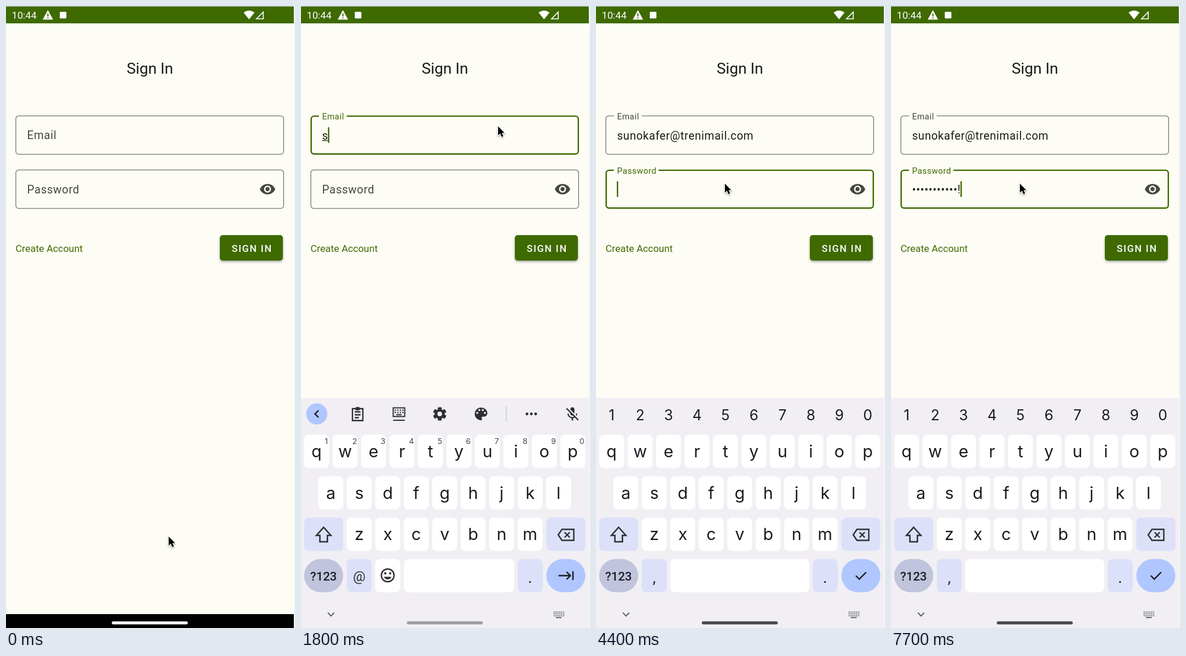
These frames come from a looping animation (500 by 1075 pixels, 8 s). An HTML page with a canvas:

```html
<!DOCTYPE html>
<html lang="en">
<head>
<meta charset="utf-8">
<title>Sign In</title>
<style>
html, body { margin: 0; width: 100%; height: 100%; overflow: hidden; background: #f6f6f4; }
canvas { display: block; }
</style>
</head>
<body>
<canvas id="stage" width="500" height="1075"></canvas>
<script>
const c = document.getElementById('stage').getContext('2d');
const LOOP = 8000, TICK = 100, W = 498;
const PAGE = '#fdfdf5', GREEN = '#3e6a00', INK = '#1b1c18', GREY = '#46483f', LINE = '#75786c';
const BOARD = '#f1eff4', KEY_INK = '#1c1c20', ICON = '#303034';
const TINT = '#dce1f9', DIM = '#c0c4dc', BLUE = '#b0c6ff';
const USER = 'sunokafer', DOMAIN = '@trenimail.com', SECRET = 'password123!';
const USER_TIMES = [1800, 2000, 2200, 2300, 2500, 2700];
const SECRET_TIMES = [5300, 5700, 5900, 6000, 6100, 6200, 6300, 6400, 6600, 7000, 7100, 7700];
const FILL_AT = 3400, EMAIL_AT = 1100, SECRET_AT = 4200;

const clamp = v => Math.max(0, Math.min(1, v));
const mix = (a, b, p) => a + (b - a) * p;
const smooth = p => p * p * (3 - 2 * p);
const decel = p => 1 - (1 - p) ** 2;
const count = (times, t) => times.filter(s => s <= t).length;

function text(str, x, y, size, color = INK, { align = 'left', weight = 400, gap = 0, font = 'Roboto' } = {}) {
  c.font = `${weight} ${size}px ${font}, sans-serif`;
  c.letterSpacing = gap + 'px';
  c.textAlign = align;
  c.fillStyle = color;
  c.fillText(str, x, y);
  return c.measureText(str).width;
}
const keyText = (str, x, y, size, color = KEY_INK, weight = 400) =>
  text(str, x, y, size, color, { align: 'center', weight, font: 'Inter' });

function box(x, y, w, h, r, color) {
  c.fillStyle = color;
  c.beginPath();
  c.roundRect(x, y, w, h, r);
  c.fill();
}
function disc(x, y, r, color) {
  c.fillStyle = color;
  c.beginPath();
  c.arc(x, y, r, 0, 7);
  c.fill();
}
function stroke(d, x, y, width = 2.4, color = ICON) {
  c.save();
  c.translate(x, y);
  c.lineWidth = width;
  c.strokeStyle = color;
  c.stroke(new Path2D(d));
  c.restore();
}
function fill(d, x, y, color = ICON, scale = 1) {
  c.save();
  c.translate(x, y);
  c.scale(scale, scale);
  c.fillStyle = color;
  c.fill(new Path2D(d), 'evenodd');
  c.restore();
}
// 24-unit icon centred on x, y
const icon = (d, x, y, color, s = 1.211) => fill(d, x - 12 * s, y - 12 * s, color, s);

const EYE = 'M12 4.5C7 4.5 2.73 7.61 1 12c1.73 4.39 6 7.5 11 7.5s9.27-3.11 11-7.5c-1.73-4.39-6-7.5-11-7.5z' +
  'M12 17c-2.76 0-5-2.24-5-5s2.24-5 5-5 5 2.24 5 5-2.24 5-5 5zm0-8c-1.66 0-3 1.34-3 3s1.34 3 3 3 3-1.34 3-3-1.34-3-3-3z';
const PALETTE = 'M12 3c-4.97 0-9 4.03-9 9s4.03 9 9 9c.83 0 1.5-.67 1.5-1.5 0-.39-.15-.74-.39-1.01-.23-.26-.38-.61-.38-.99 ' +
  '0-.83.67-1.5 1.5-1.5H16c2.76 0 5-2.24 5-5 0-4.42-4.03-8-9-8z';
const MIC_OFF = 'M19 11h-1.7c0 .74-.16 1.43-.43 2.05l1.23 1.23c.56-.98.9-2.09.9-3.28zm-4.02.17c0-.06.02-.11.02-.17V5' +
  'c0-1.66-1.34-3-3-3S9 3.34 9 5v.18l5.98 5.99zM4.27 3L3 4.27l6.01 6.01V11c0 1.66 1.33 3 2.99 3 .22 0 .44-.03.65-.08' +
  'l1.66 1.66c-.71.33-1.5.52-2.31.52-2.76 0-5.3-2.1-5.3-5.1H5c0 3.41 2.72 6.23 6 6.72V21h2v-3.28c.91-.13 1.77-.45 2.54-.9' +
  'L19.73 21 21 19.73 4.27 3z';

function statusBar() {
  c.fillStyle = '#c9cbc4';
  c.fillRect(0, 0, W, 1);
  c.fillStyle = GREEN;
  c.fillRect(0, 1, W, 29);
  text('10:44', 10, 22, 17.2, '#fff');
  fill('M0-9L9 7.5H-9ZM-1-3V2H1V-3ZM-1 3.6V5.6H1V3.6Z', 72.5, 16, '#fff');
  box(93, 10, 11.5, 11.5, 1.5, '#fff');
  fill('M0 7.5L-9.5-4.2Q0-11.5 9.5-4.2Z', 420.5, 15.5, '#fff');
  stroke('M6 6.2H-5.6L6-5.6Z', 439, 16, 1.6, '#fff');
}

// The border grows inwards when the field is focused.
function outline(y, notch, focused) {
  const width = focused ? 2.4 : 1.3, inset = width / 2, k = 5;
  const l = 16.4 + inset, r = 481 - inset, top = y - 0.8 + inset, b = y + 67 - inset;
  c.strokeStyle = focused ? GREEN : LINE;
  c.lineWidth = width;
  c.beginPath();
  c.moveTo(31 + notch, top);
  c.arcTo(r, top, r, b, k);
  c.arcTo(r, b, l, b, k);
  c.arcTo(l, b, l, top, k);
  c.arcTo(l, top, r, top, k);
  c.lineTo(31, top);
  c.stroke();
}

function field(label, y, notch, start, focused, t) {
  const p = smooth(clamp((t - start - 50) / 167));
  const size = mix(19.4, 14.5, p);
  outline(y, p > 0 ? notch : 0, focused);
  text(label, 36.5, mix(y + 40, y + 6, p), size, focused ? GREEN : GREY, { gap: size / 32 });
}

function caret(x, y, t, since) {
  if (Math.floor((t - since) / 500) % 2) return;
  c.fillStyle = GREEN;
  c.fillRect(x, y, 2.4, 27);
}

function form(t) {
  c.fillStyle = PAGE;
  c.fillRect(0, 1, W, 1074);
  statusBar();
  text('Sign In', 249, 117, 26.65, INK, { align: 'center' });

  const onEmail = t >= EMAIL_AT && t < SECRET_AT, onSecret = t >= SECRET_AT;
  field('Email', 190, 48, EMAIL_AT, onEmail, t);
  field('Password', 283.5, 77, SECRET_AT, onSecret, t);
  icon(EYE, 452.5, 316.5, GREY);

  const typed = USER.slice(0, count(USER_TIMES, t));
  const email = t >= FILL_AT ? USER + DOMAIN : typed;
  const width = text(email, 36.5, 230.5, 19.4, INK, { gap: 0.6 });
  if (typed && t < FILL_AT) {
    c.fillStyle = INK;
    c.fillRect(36.5, 232, width, 1.2);
  }
  const edits = [EMAIL_AT, ...USER_TIMES, FILL_AT].filter(s => s <= t);
  if (onEmail) caret(36 + width, 209.5, t, edits.at(-1));

  const n = count(SECRET_TIMES, t);
  const masked = n ? '•'.repeat(n - 1) + SECRET[n - 1] : '';
  const secretWidth = text(masked, 36.5, 324, 19.4, INK, { gap: 0.6 });
  if (onSecret) caret(36 + secretWidth, 303, t, n ? SECRET_TIMES[n - 1] : 4100);

  text('Create Account', 16.6, 425, 16.95, GREEN);
  c.save();
  c.shadowColor = 'rgba(0,0,0,.35)';
  c.shadowBlur = 4;
  c.shadowOffsetY = 2;
  box(370, 396, 109, 44, 5, GREEN);
  c.restore();
  text('SIGN IN', 390.5, 425, 16.95, '#fff', { weight: 500, gap: 1.51 });
}

function chevronButton(dir) {
  disc(27.3, 705, 18.3, BLUE);
  stroke(`M${-3 * dir}-6L${3 * dir} 0L${-3 * dir} 6`, 27.3, 705, 2.4, KEY_INK);
}

function toolbar() {
  chevronButton(-1);
  stroke('M-9-9H9V11.5H-9ZM-5-3.5H5M-5 1.5H5M-5 6.5H2', 98, 705, 2.3);
  box(94, 693, 8, 6, 3, ICON);

  stroke('M-10-10.5H10V4.5H-10ZM-10 11H10', 169.5, 705, 2);
  for (let i = 0; i < 4; i++)
    for (let j = 0; j < 2; j++) box(162 + i * 4.4, 697.5 + j * 4, 2.2, 2.2, 0, ICON);
  box(165, 705.4, 9, 2, 0, ICON);

  disc(240, 705, 8.6, ICON);
  for (let i = 0; i < 6; i++) {
    c.save();
    c.translate(240, 705);
    c.rotate(i * Math.PI / 3);
    box(-3.2, -11.6, 6.4, 8, 1, ICON);
    c.restore();
  }
  disc(240, 705, 4, BOARD);

  icon(PALETTE, 311.5, 705, ICON);
  for (const [x, y] of [[-5.5, -1.5], [-2.5, -5.5], [2.5, -5.5], [5.5, -1.5]])
    disc(311.5 + x * 1.211, 705 + y * 1.211, 1.8, BOARD);
  box(354.5, 692, 1.2, 26, 0, '#c6c5cc');
  for (const x of [391, 398.5, 406]) disc(x, 705, 2.4, ICON);
}

function suggestions(t) {
  chevronButton(1);
  text(USER.slice(0, count(USER_TIMES, t)), 122, 714, 22, KEY_INK, { align: 'center' });
  if (t >= 3200) box(194, 679, 141, 52.5, 0, DIM);
  else for (const x of [193.5, 335]) box(x, 692, 1.2, 26, 0, '#c6c5cc');
  text(USER, 263.5, 698.5, 19.3, KEY_INK, { align: 'center', weight: 500 });
  text(DOMAIN, 263.5, 720.5, 14.7, KEY_INK, { align: 'center' });
}

function keyRow(letters, x0, y) {
  [...letters].forEach((ch, i) => {
    const x = x0 + i * 49.25;
    box(x - 21.6, y, 43.2, 57.5, 8, '#fff');
    keyText(ch, x, y + 39, 29);
  });
}

function keyboard(t) {
  const secret = t >= 4300;
  box(0, 677, W, 400, 0, BOARD);

  if (!secret) {
    if (t >= 1900 && t < 3500) suggestions(t);
    else toolbar();
    icon(MIC_OFF, 469.5, 705.5, ICON);
  }
  keyRow('qwertyuiop', 27, 741);
  keyRow('asdfghjkl', 51.6, 812.8);
  keyRow('zxcvbnm', 100.8, 884.3);
  [...'1234567890'].forEach((d, i) => {
    if (secret) keyText(d, 27 + i * 49.25, 716, 25);
    else keyText(d, 43.7 + i * 49.15, 757, 13.5, '#44464f');
  });

  box(5.5, 884.3, 67.5, 57.5, 8, TINT);
  stroke('M0-12.5L12.5 1.5H6.5V12.5H-6.5V1.5H-12.5Z', 39.2, 913.5, 2.5);
  box(424.5, 884.3, 67.5, 57.5, 8, TINT);
  stroke('M-13.5 0L-7-9.5H13.5V9.5H-7ZM-2.5-4.5L6.5 4.5M6.5-4.5L-2.5 4.5', 458.5, 914, 2.4);

  box(5.5, 955.8, 67.5, 57.5, 28.7, DIM);
  text('?123', 39, 993, 21, KEY_INK, { align: 'center', weight: 500 });
  box(79.2, 955.8, 43.2, 57.5, 8, TINT);
  text(secret ? ',' : '@', 100.8, secret ? 997 : 993.5, secret ? 28 : 24, ICON, { align: 'center' });
  if (secret) {
    box(128.6, 955.8, 240.4, 57.5, 8, '#fff');
  } else {
    box(128.6, 955.8, 43.2, 57.5, 8, '#fff');
    stroke('M11 0A11 11 0 1 1-11 0A11 11 0 1 1 11 0', 150, 984, 2.4);
    fill('M-6.4 2.4H6.4A6.8 6.8 0 0 1-6.4 2.4Z', 150, 984);
    disc(145.8, 980.5, 2, ICON);
    disc(154.2, 980.5, 2, ICON);
    box(178, 955.8, 191, 57.5, 8, '#fff');
  }
  box(375, 955.8, 43.2, 57.5, 8, TINT);
  text('.', 396.5, 997, 28, KEY_INK, { align: 'center' });
  box(424.5, 955.8, 67.5, 57.5, 28.7, BLUE);
  stroke(secret ? 'M-9 0L-3 6L9-6' : 'M-13 0H7M1-6.5L7.5 0L1 6.5M12-7.5V7.5', 458.5, 984.5, 2.4, KEY_INK);

  stroke('M-5.5-3L0 2.8L5.5-3', 52, 1051.5, 2, '#66666b');
  for (let i = 0; i < 6; i++)
    for (let j = 0; j < 3; j++) box(437 + i * 3.3, 1046.5 + j * 3.2, 1.9, 1.9, 0, '#66666b');
  box(441, 1056, 10, 1.9, 0, '#66666b');
}

function navigation(t, rise) {
  c.fillStyle = `rgba(0,0,0,${1 - rise})`;
  c.fillRect(0, 1051, W, 24);
  const v = Math.round(mix(244, 72, clamp((t - 1500) / 600)));
  box(183, 1063.5, 131.5, 5.2, 2.6, `rgb(${v},${v},${v})`);
}

function pointer(t) {
  const moves = [[100, 900, 341, 208], [2800, 3200, 292, 709], [3700, 4000, 223, 307]];
  let x = 281.5, y = 917;
  for (const [from, to, nx, ny] of moves) {
    const p = smooth(clamp((t - from + TICK) / (to - from + TICK)));
    x = mix(x, nx, p);
    y = mix(y, ny, p);
  }
  const arrow = 'M0 0V15.5L3.6 12.2L6.2 18.2L9 17L6.4 11.2H11Z';
  c.save();
  c.shadowColor = 'rgba(0,0,0,.35)';
  c.shadowBlur = 3;
  c.shadowOffsetY = 1.5;
  stroke(arrow, x, y, 2, '#fff');
  c.restore();
  fill(arrow, x, y, '#000');
}

function draw(now) {
  const t = Math.floor(now % LOOP / TICK) * TICK;
  c.fillStyle = '#f6f6f4';
  c.fillRect(0, 0, 500, 1075);
  c.save();
  c.beginPath();
  c.rect(0, 0, W, 1075);
  c.clip();
  form(t);
  const p = clamp((t - 1150) / 288), rise = decel(p);
  if (p > 0) {
    c.save();
    c.globalAlpha = clamp(0.6 + 0.6 * p);
    c.translate(0, 398 * (1 - rise));
    keyboard(t);
    c.restore();
  }
  navigation(t, rise);
  pointer(t);
  c.restore();
}

const begin = performance.now();
function loop() {
  draw(performance.now() - begin);
  requestAnimationFrame(loop);
}
loop();
</script>
</body>
</html>
```
